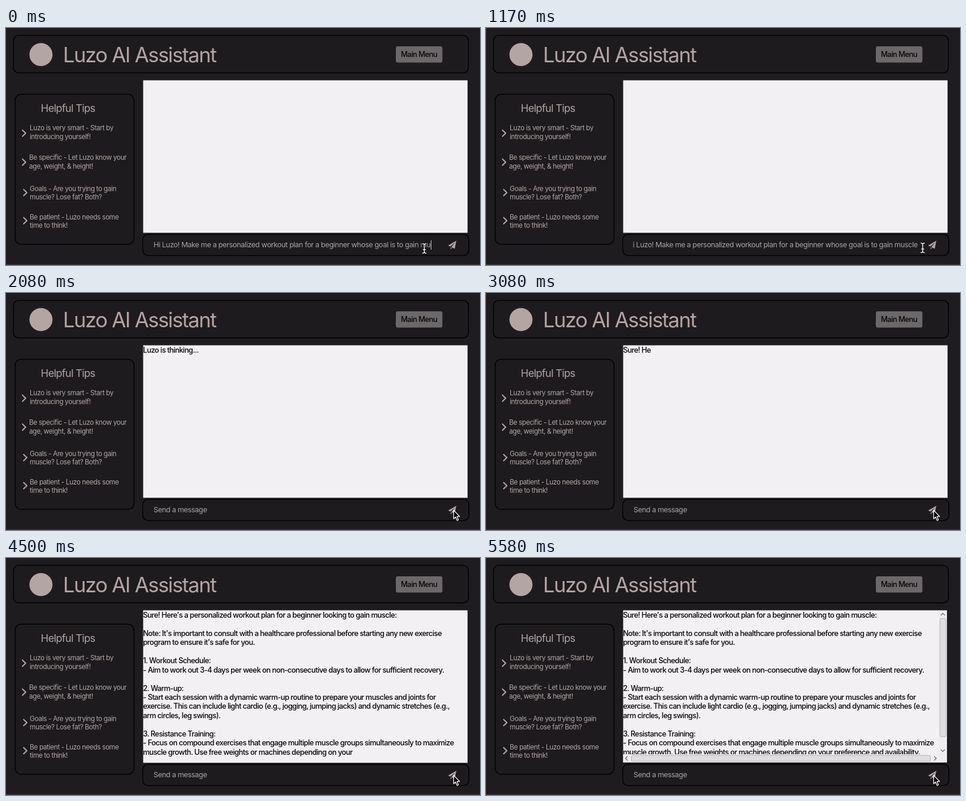
Write an HTML page that moves like this. It is 800 px wide and 401 px high and loops after 5660 ms.

```html
<!DOCTYPE html>
<html lang="en">
<head>
<meta charset="utf-8">
<title>Assistant chat</title>
<style>
  html, body { margin: 0; width: 100%; height: 100%; overflow: hidden; background: #1e1c1f; }
  svg { display: block; width: 100%; height: 100%; }
  text { font-family: Inter, Roboto, "Liberation Sans", sans-serif; font-optical-sizing: none; white-space: pre; fill: #b3a5a4; }
  .panel { fill: #1d1b1e; stroke: #020202; stroke-width: 1.5; }
  .title { font-size: 35px; letter-spacing: -1.58px; }
  .head { font-size: 17.5px; letter-spacing: -.67px; }
  .tip { font-size: 11.5px; letter-spacing: -.44px; }
  .field { font-size: 12.3px; letter-spacing: -.43px; fill: #aaa2a4; }
  .body { font-size: 12.6px; font-weight: 500; letter-spacing: -.62px; fill: #060506; }
  .chevron { fill: none; stroke: #b3a5a4; stroke-width: 2; stroke-linecap: round; stroke-linejoin: round; }
  .bar { fill: #efedf0; }
  .thumb { fill: #dfdde1; stroke: #a9a7ab; stroke-width: .8; }
  .arrows { fill: none; stroke: #6c6a6e; stroke-width: 1.2; }
</style>
</head>
<body>
<svg viewBox="0 0 800 401" preserveAspectRatio="none">
  <defs>
    <clipPath id="fieldClip"><rect x="248" y="352" width="484" height="30"/></clipPath>
    <clipPath id="chatClip"><rect id="chatArea" x="231.5" y="88.5" width="547.5" height="258"/></clipPath>
    <path id="beamShape" d="M-3-8Q0-8 0-6Q0-8 3-8M0-6V6M-2 2H2M-3 8Q0 8 0 6Q0 8 3 8"/>
  </defs>
  <rect width="800" height="401" fill="#1e1c1f"/>
  <rect y="399.5" width="800" height="1.5" fill="#343235"/>

  <rect class="panel" x="12.5" y="12.5" width="768" height="63.5" rx="9"/>
  <circle cx="59" cy="45" r="19.5" fill="#b3a5a4"/>
  <text class="title" x="96.3" y="57.5">Luzo AI Assistant</text>
  <rect x="658" y="31" width="78.5" height="27.5" rx="3" fill="#6c686a"/>
  <text class="body" x="666.5" y="48.8">Main Menu</text>

  <rect class="panel" x="15.5" y="112" width="200.5" height="254" rx="10"/>
  <text class="head" x="58.8" y="142">Helpful Tips</text>
  <g id="tips"></g>

  <rect x="231.5" y="88.5" width="547.5" height="258" fill="#f3f0f4"/>
  <g id="chat" clip-path="url(#chatClip)"></g>
  <g id="bars">
    <rect class="bar" x="764" y="89" width="14" height="257"/>
    <rect class="bar" x="231.5" y="332" width="546.5" height="14"/>
    <rect class="thumb" x="766.2" y="102.5" width="10" height="200" rx="2"/>
    <rect class="thumb" x="245.5" y="334" width="504.5" height="10" rx="2"/>
    <path class="arrows" d="M767.5 97l3.5-3.5 3.5 3.5M767.5 324l3.5 3.5 3.5-3.5M239 335.5l-3.5 3.5 3.5 3.5M756.5 335.5l3.5 3.5-3.5 3.5"/>
    <path d="M778 88H780V347H231V346H778Z" fill="#1e1c1f"/>
  </g>

  <rect class="panel" x="230.75" y="349" width="550.5" height="36" rx="9"/>
  <g clip-path="url(#fieldClip)">
    <text id="field" class="field" x="249" y="371.2"></text>
    <rect id="caret" y="359" width="1" height="16" fill="#c9c4c6"/>
  </g>
  <path fill="#b3a5a4" d="M760 360L746.3 368.1 749.9 369.8 757.6 363.2 751.7 370.7 757.3 373.4ZM750.5 371V374.6L752.7 372Z"/>

  <g id="beam" fill="none" stroke-linecap="round">
    <use href="#beamShape" stroke="#111" stroke-width="3.4"/>
    <use href="#beamShape" stroke="#f4f2f4" stroke-width="1.5"/>
  </g>
  <path id="arrow" d="M0 0V14.5L3.3 11.4 5.8 17.3 8.1 16.3 5.7 10.5H10.2Z" fill="#080808" stroke="#fff" stroke-width="1.2" stroke-linejoin="round"/>
</svg>
<script>
const LOOP = 5660, STEP = 1000 / 12;
const NS = "http://www.w3.org/2000/svg";
const $ = id => document.getElementById(id);

function add(parent, tag, attrs, label = "") {
  const el = document.createElementNS(NS, tag);
  for (const key in attrs) el.setAttribute(key, attrs[key]);
  el.textContent = label;
  return parent.appendChild(el);
}
const show = (el, on) => el.setAttribute("visibility", on ? "visible" : "hidden");
const setText = (el, s) => { if (el.textContent !== s) el.textContent = s; };

// text x, baseline, chevron centre x and y, two lines
const tips = [
  [40, 173.4, 30.5, 178, "Luzo is very smart - Start by", "introducing yourself!"],
  [39, 223.4, 30.5, 227, "Be specific - Let Luzo know your", "age, weight, & height!"],
  [40, 276.2, 32.5, 278.5, "Goals - Are you trying to gain", "muscle? Lose fat? Both?"],
  [40, 323.7, 32.5, 326, "Be patient - Luzo needs some", "time to think!"]
];
for (const [x, y, cx, cy, first, second] of tips) {
  add($("tips"), "path", { class: "chevron", d: `M${cx - 2.7} ${cy - 5.3}l5.4 5.3-5.4 5.3` });
  add($("tips"), "text", { class: "tip", x, y }, first);
  add($("tips"), "text", { class: "tip", x, y: y + 14.1 }, second);
}

const reply = `Sure! Here's a personalized workout plan for a beginner looking to gain muscle:

Note: It's important to consult with a healthcare professional before starting any new exercise
program to ensure it's safe for you.

1. Workout Schedule:
- Aim to work out 3-4 days per week on non-consecutive days to allow for sufficient recovery.

2. Warm-up:
- Start each session with a dynamic warm-up routine to prepare your muscles and joints for
exercise. This can include light cardio (e.g., jogging, jumping jacks) and dynamic stretches (e.g.,
arm circles, leg swings).

3. Resistance Training:
- Focus on compound exercises that engage multiple muscle groups simultaneously to maximize
muscle growth. Use free weights or machines depending on your preference and availability.`;
const rows = reply.split("\n").map((_, i) =>
  add($("chat"), "text", { class: "body", x: 231.2, y: 101.1 + 15.43 * i }));

const prompt = "Hi Luzo! Make me a personalized workout plan for a beginner whose goal is to gain muscle";
const keyTimes = [170, 420, 670, 750];
const SENT = 1830, BLUR = 1580, ANSWER = 35, CUT = 53, BARS = 64;

// pointer stops: time, x, y
const beamPath = [[750, 706, 373], [1000, 728, 372], [1170, 737, 372], [1330, 739, 372]];
const arrowPath = [[1250, 744, 367], [1420, 759, 370], [1580, 759, 370], [1830, 755.5, 367.6]];

function along(path, t) {
  if (t <= path[0][0]) return path[0].slice(1);
  for (let i = 1; i < path.length; i++) {
    const [t0, x0, y0] = path[i - 1], [t1, x1, y1] = path[i];
    if (t < t1) {
      const p = (t - t0) / (t1 - t0);
      return [x0 + (x1 - x0) * p, y0 + (y1 - y0) * p];
    }
  }
  return path[path.length - 1].slice(1);
}

function chatText(t, k) {
  if (t < SENT) return "";
  if (k < ANSWER) return "Luzo is thinking...";
  // three letters per step, with a jump ahead at CUT
  const n = k < CUT ? 2 + 3 * (k - ANSWER) : reply.length - 2 + 3 * (k - BARS + 1);
  return reply.slice(0, n);
}

function drawField(t) {
  const field = $("field");
  const typed = keyTimes.filter(at => t >= at).length;
  setText(field, t < SENT ? prompt.slice(0, prompt.length - 4 + typed) : "Send a message");
  const width = field.getComputedTextLength();
  const shift = t < BLUR ? Math.max(0, width - 479.5) : 0;
  field.setAttribute("x", 249 - shift);
  $("caret").setAttribute("x", 249.5 + width - shift);
  show($("caret"), t < 1160);
}

function draw(now) {
  const k = Math.floor((now % LOOP + 3.4) / STEP);
  const t = Math.round(k * STEP / 10) * 10;
  drawField(t);

  const lines = chatText(t, k).split("\n");
  rows.forEach((row, i) => setText(row, lines[i] || ""));
  show($("bars"), k >= BARS);
  $("chatArea").setAttribute("height", k >= BARS ? 243.5 : 258);

  const onIcon = t >= 1330;
  show($("beam"), !onIcon);
  show($("arrow"), onIcon);
  const [x, y] = along(onIcon ? arrowPath : beamPath, t);
  $(onIcon ? "arrow" : "beam").setAttribute("transform", `translate(${x} ${y})`);
}

const start = performance.now();
function tick() {
  draw(performance.now() - start);
  requestAnimationFrame(tick);
}
tick();
</script>
</body>
</html>
```
